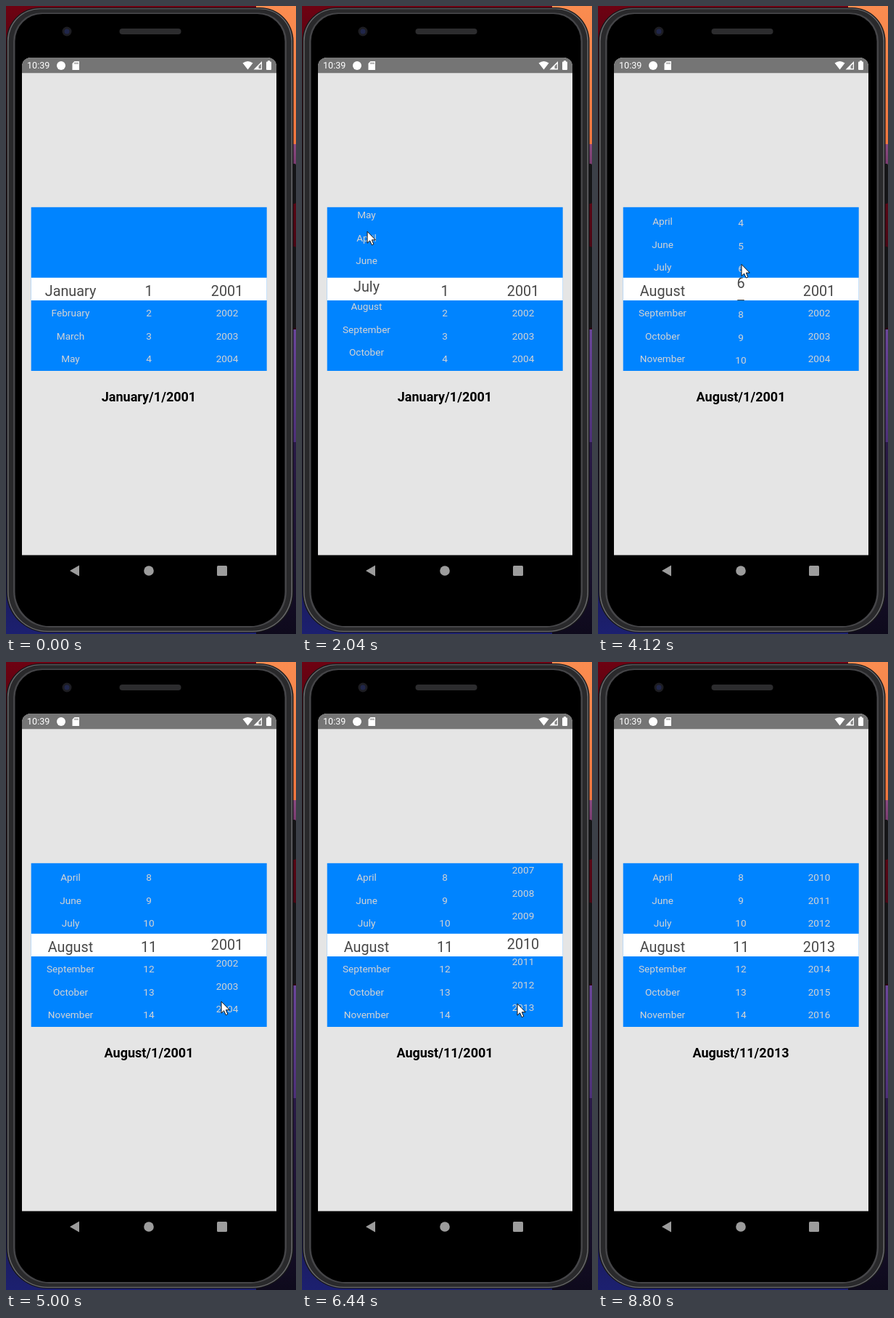
These frames come from a looping animation (400x864 px, 9880 ms). An HTML page with a canvas:

```html
<!DOCTYPE html>
<html lang="en">
<head>
<meta charset="utf-8">
<title>Date picker</title>
<style>
html, body { margin: 0; width: 100%; height: 100%; overflow: hidden; background: #000; }
canvas { display: block; }
</style>
</head>
<body>
<canvas id="stage" width="400" height="864"></canvas>
<script>
const LOOP = 9880, STEP = 40, ROW = 31.5, MID = 390.7;
const LAG = 18, GLIDE = 500, LABEL_DELAY = 500;
const c = document.getElementById('stage').getContext('2d');

const count = (from, n) => Array.from({ length: n }, (_, i) => String(from + i));
const months = ['January', 'February', 'March', 'May', 'April', 'June', 'July',
  'August', 'September', 'October', 'November', 'December'];

// Each flick drags a column from y0 to y1, then the wheel glides to its rest row
const flick = (start, time, y0, y1, rest) => ({ start, end: start + time, y0, y1, rest });
const columns = [
  { x: 89, grip: 87, items: months, flicks: [flick(1240, 700, 476, 300, 7)] },
  { x: 197, grip: 198, items: count(1, 31),
    flicks: [flick(3120, 240, 470, 410, 2), flick(3937, 360, 479, 238, 10)] },
  { x: 305, grip: 297, items: count(2001, 30),
    flicks: [flick(4960, 130, 475, 440, 1), flick(5230, 973, 490, 256, 9),
      flick(6400, 200, 480, 385, 12)] }
];

// The pointer visits both ends of every flick, and a few places between
const stop = (t, x, y) => ({ t, x, y });
const stops = [
  stop(0, 406, 430), stop(560, 87, 476), stop(2560, 131, 447), stop(2720, 165, 517),
  stop(2880, 165, 517), stop(7280, 345, 502), stop(7760, 345, 502),
  stop(8200, 122, 550), stop(8800, 406, 417),
  ...columns.flatMap(({ grip, flicks }) =>
    flicks.flatMap(f => [stop(f.start, grip, f.y0), stop(f.end, grip, f.y1)]))
].sort((a, b) => a.t - b.t);

const unit = v => Math.min(1, Math.max(0, v));
const smooth = u => u * u * (3 - 2 * u);
const mix = (a, b, u) => a + (b - a) * u;

function rowAt({ flicks }, t) {
  let row = 0;
  for (const { start, end, y0, y1, rest } of flicks) {
    if (t < start) break;
    const dragged = row + (y0 - y1) / ROW * smooth(unit((t - start) / (end - start)));
    const glide = 1 - (1 - unit((t - end) / GLIDE)) ** 3;
    row = mix(dragged, rest, glide);
    if (t < end + GLIDE && f_isLast(flicks, start, t)) break;
    row = rest;
  }
  return row;
}

// True when no later flick has begun
function f_isLast(flicks, start, t) {
  return !flicks.some(f => f.start > start && f.start <= t);
}

function labelAt(t) {
  return columns.map(({ items, flicks }) => {
    const last = flicks[flicks.length - 1];
    return items[t >= last.end + GLIDE + LABEL_DELAY - STEP ? last.rest : 0];
  }).join('/');
}

function rect(x, y, w, h, fill) {
  c.fillStyle = fill;
  c.fillRect(x, y, w, h);
}

function round(x, y, w, h, r, fill) {
  c.beginPath();
  c.roundRect(x, y, w, h, r);
  c.fillStyle = fill;
  c.fill();
}

function disc(x, y, r, fill) {
  c.beginPath();
  c.arc(x, y, r, 0, 7);
  c.fillStyle = fill;
  c.fill();
}

function poly(points, fill, stroke) {
  c.beginPath();
  points.forEach(([x, y]) => c.lineTo(x, y));
  c.closePath();
  c.fillStyle = fill;
  c.fill();
  if (stroke) {
    c.strokeStyle = stroke;
    c.stroke();
  }
}

function text(s, x, y, font, fill, align = 'center') {
  c.font = font + ' Roboto, sans-serif';
  c.textAlign = align;
  c.fillStyle = fill;
  c.fillText(s, x, y);
}

function band(x, y, w, h, ...colors) {
  const g = c.createLinearGradient(0, y, 0, y + h);
  colors.forEach((color, i) => g.addColorStop(i / (colors.length - 1), color));
  rect(x, y, w, h, g);
}

function drawPhone() {
  band(0, 0, 345, 864, '#6e0212', '#24040c', '#0c060c', '#1a1030', '#1c2070');
  band(345, 0, 55, 190, '#fa8c50', '#f0763f');
  band(345, 190, 55, 80, '#8a4a80', '#5a2050');
  band(345, 270, 55, 175, '#5a0614', '#2c0612');
  band(345, 445, 55, 155, '#6a459a', '#4c2f78');
  band(345, 600, 55, 264, '#2a1a48', '#0e0a1c');
  round(394, 217, 6, 55, 2, '#151517');
  round(394, 331, 6, 112, 2, '#151517');

  // Nested shells, from the outer edge to the glass
  const shells = [[0, '#18181a'], [1.5, '#68686b'], [3, '#29292b'], [9.5, '#454548'], [12, '#000']];
  for (const [inset, color] of shells) {
    const dy = inset * 0.75, top = 46 - inset * 0.7, bottom = 56 - inset * 0.7;
    round(0.5 + inset, 2 + dy, 396 - 2 * inset, 860 - 2 * dy, [top, top, bottom, bottom], color);
  }

  disc(84, 35, 6.5, '#1d1d22');
  disc(84, 35, 3.5, '#20264a');
  round(156.5, 31, 85, 8, 4, '#2c2c2e');

  round(22, 71, 351, 684.5, [12, 12, 0, 0], '#e5e5e5');
  round(22, 71, 351, 21.3, [12, 12, 0, 0], '#757575');

  const nav = '#9c9c9c';
  poly([[88, 777], [101, 769.5], [101, 784.5]], nav);
  disc(197, 777, 6.8, nav);
  round(291, 770, 14, 14, 1.5, nav);
}

function drawStatus() {
  text('10:39', 29, 86.3, '12.6px', '#fff', 'left');
  disc(76, 82, 6, '#fff');
  poly([[94.5, 76], [101, 76], [101, 88], [91.5, 88], [91.5, 79]], '#fff');
  for (let x = 94.5; x < 100; x += 2) rect(x, 77.5, 1, 2.5, '#757575');
  c.beginPath();
  c.moveTo(333.5, 87.5);
  c.lineTo(326.5, 78.5);
  c.quadraticCurveTo(333.5, 73.5, 340.5, 78.5);
  c.fillStyle = '#fff';
  c.fill();
  poly([[341.5, 87.5], [353, 76], [353, 87.5]], '#fff');
  poly([[348.5, 86], [348.5, 82.5], [351.8, 79.5], [351.8, 86]], '#858585');
  round(359, 76.5, 7, 11.5, 1, '#fff');
  rect(361, 75.2, 3, 2, '#fff');
}

function drawRows(t, top, height, fill, font, color, shift) {
  c.save();
  c.beginPath();
  c.rect(34.7, top, 325, height);
  c.clip();
  rect(34, top, 327, height, fill);
  for (const column of columns) {
    const row = rowAt(column, t);
    column.items.forEach((s, i) => text(s, column.x, MID + (i - row) * ROW + shift, font, color));
  }
  c.restore();
}

function drawPicker(t) {
  drawRows(t, 276.6, 225.4, '#0084ff', '13.6px', '#d3d3d3', 4.8);
  // The selected row follows the wheel slightly late
  drawRows(t - LAG, 373.6, 31.6, '#fff', '19.8px', '#484848', 7.8);
  text(labelAt(t), 197, 543.6, '700 18px', '#000');
}

function drawPointer(t) {
  const next = Math.max(1, stops.findIndex(s => s.t > t));
  const [a, b] = t < 8800 ? [stops[next - 1], stops[next]] : stops.slice(-2);
  const u = smooth(unit((t - a.t) / (b.t - a.t)));
  const x = mix(a.x, b.x, u), y = mix(a.y, b.y, u);
  const arrow = [[0, 0], [0, 16], [3.6, 12.6], [6.2, 18.6], [8.8, 17.4], [6.3, 11.6], [11.3, 11.6]];
  poly(arrow.map(([dx, dy]) => [x + dx, y + dy]), '#fff', '#111');
}

function frame(now) {
  const t = Math.floor(now % LOOP / STEP) * STEP;
  drawPhone();
  drawStatus();
  drawPicker(t);
  drawPointer(t);
  requestAnimationFrame(frame);
}
requestAnimationFrame(frame);
</script>
</body>
</html>
```
